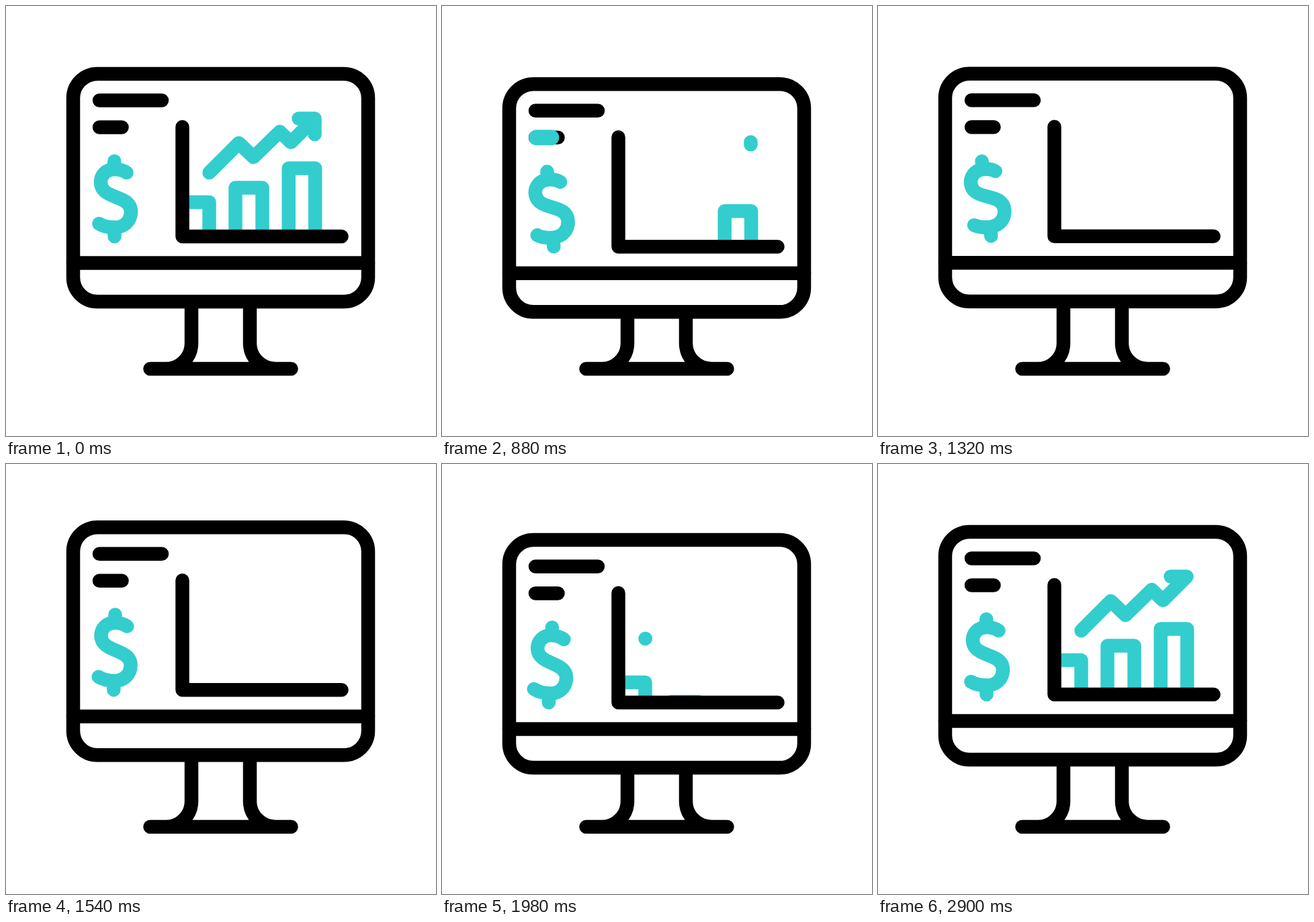
Animation, 640 px wide and 640 px high, one loop 2.92 s. Source, as an HTML page:

```html
<!DOCTYPE html>
<html lang="en">
<head>
<meta charset="utf-8">
<title>Growth chart on a monitor</title>
<style>
  html, body { margin: 0; width: 100%; height: 100%; overflow: hidden; background: #fff; }
  svg { display: block; width: 100vw; height: 100vh; }
  path, rect { fill: none; stroke: #000; stroke-width: 20.5; stroke-linecap: round; stroke-linejoin: round; }
  .teal path, path.teal { stroke: #33cdce; }
  path.mark { stroke-width: 23; }
</style>
</head>
<body>
<svg viewBox="0 0 640 640">
  <clipPath id="plot"><rect x="262" y="100" width="260" height="243"/></clipPath>
  <path d="M276 435V502A38 38 0 0 1 238 540M363 435V502A38 38 0 0 0 401 540M214.5 540H424.5"/>
  <g id="screen">
    <rect x="100" y="101" width="439" height="339" rx="36" style="fill:#fff"/>
    <path d="M100 382.5H539M139 140.5H232M139 180.5H172.5"/>
    <path id="mark1" class="teal mark" pathLength="1" d="M139 140.5H232.5"/>
    <path id="mark2" class="teal mark" pathLength="1" d="M139.5 180.5H172.5"/>
    <g id="dollar" class="teal">
      <path d="M161.3 231V242M161.5 332V343M179.5 248C174 244 168 243 161 243C149 243 141 252 141 262C141 273 148 278 158 282L170 287C180 291 186 297 186 306C186 320 176 329.5 162 329.5C151 329.5 144 327.500 138.500 324"/>
    </g>
    <g class="teal" clip-path="url(#plot)">
      <path id="bar1"/>
      <path id="bar2"/>
      <path id="bar3"/>
    </g>
    <path d="M262.500 180V343H499.500"/>
    <path id="shaft" class="teal" pathLength="1" d="M302.500 248L346.500 204L368.500 225L407.500 187L424 203L459 168"/>
    <path id="head" class="teal" pathLength="1" d="M435.500 167.500H459.500V191"/>
  </g>
</svg>
<script>
const LOOP = 2920, HIDDEN = 344.5;
const $ = id => document.getElementById(id);
const span = (t, a, b) => Math.min(1, Math.max(0, (t - a) / (b - a)));
const ease = (t, a, b) => { const u = span(t, a, b); return u * u * (3 - 2 * u); };
const easeOut = (t, a, b) => 1 - (1 - span(t, a, b)) ** 2;

// Eased value through [time, value] keys
function keyed(t, keys) {
  let v = keys[0][1];
  for (let i = 1; i < keys.length; i++)
    v += (keys[i][1] - keys[i - 1][1]) * ease(t, keys[i - 1][0], keys[i][0]);
  return v;
}

// Show only the part of a path between fractions a and b
function trim(id, a, b) {
  const s = $(id).style;
  s.visibility = b > a ? "visible" : "hidden";
  s.strokeDasharray = `${b - a} 2`;
  s.strokeDashoffset = -a;
}

function mark(id, t, start) {
  trim(id, ease(t, start + 234, start + 671), ease(t, start, start + 437));
}

// Erase from the start of the path, later draw it again
function redraw(id, t, out, outEnd, back, backEnd) {
  if (t < back) trim(id, ease(t, out, outEnd), 1);
  else trim(id, 0, ease(t, back, backEnd));
}

function bar(id, t, x1, x2, top, fall, rise) {
  const shown = 1 - ease(t, fall, fall + 680) + easeOut(t, rise, rise + 760);
  const y = HIDDEN + (top - HIDDEN) * shown;
  $(id).setAttribute("d", `M${x1} 370V${y}H${x2}V370`);
}

const bounce = [[600, 0], [1010, 20], [1485, -8], [1885, 14], [2300, 0]];
const swing = [[600, 0], [1160, -9.8], [1720, 4.7], [2300, 0]];

function draw(now) {
  const t = now % LOOP;
  $("screen").setAttribute("transform", `translate(0 ${keyed(t, bounce)})`);
  $("dollar").setAttribute("transform", `rotate(${keyed(t, swing)} 161.5 287)`);
  mark("mark1", t, 170);
  mark("mark2", t, 600);
  bar("bar1", t, 262.5, 302.5, 292, 48, 1700);
  bar("bar2", t, 341.5, 381.5, 270.5, 190, 1967);
  bar("bar3", t, 420.7, 460.2, 241.5, 555, 2290);
  redraw("shaft", t, 0, 760, 1960, 2822);
  redraw("head", t, 550, 950, 2720, 3080);
  requestAnimationFrame(draw);
}
requestAnimationFrame(draw);
</script>
</body>
</html>
```
